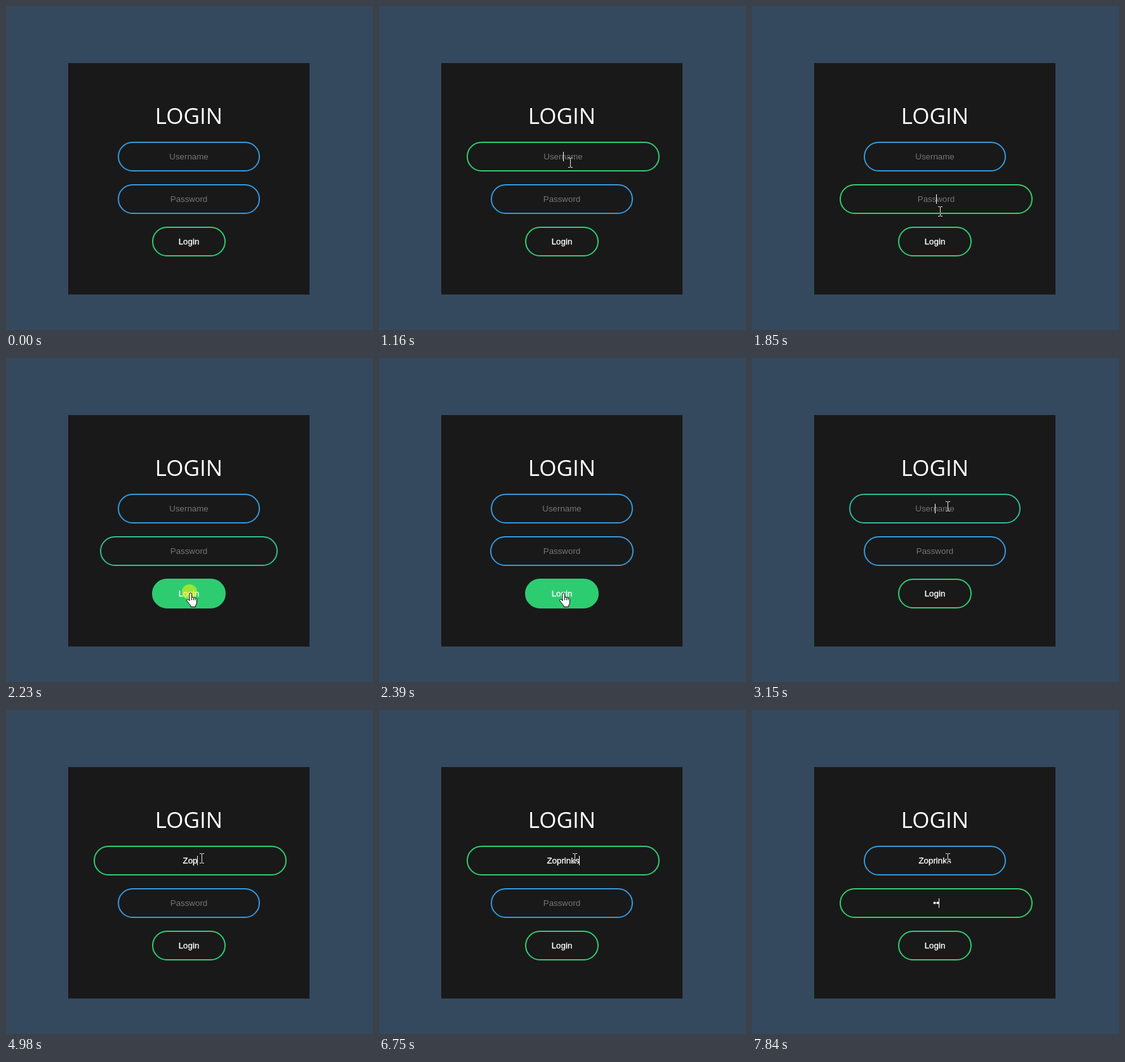
These frames come from a looping animation (578x511 px, 7.99 s). An HTML page with a canvas:

```html
<!DOCTYPE html>
<html lang="en">
<head>
<meta charset="utf-8">
<title>Login form</title>
<style>
  html, body { margin: 0; width: 100%; height: 100%; overflow: hidden; background: #34495e; }
  canvas { display: block; }
</style>
</head>
<body>
<canvas id="stage" width="578" height="511"></canvas>
<script>
const ctx = document.getElementById('stage').getContext('2d');

const LOOP = 7990, START = 380, TICK = 76.65, FADE = 250, BLINK = 540;
const BLUE = [52, 152, 219], GREEN = [46, 204, 113], DARK = [25, 25, 25];
const SANS = '13.333px "Liberation Sans", Arial, sans-serif';
const TITLE = '35px "Open Sans", "Noto Sans", sans-serif';

const NAME = 'Zoprinks';
const nameKeys = [4260, 4640, 4980, 5670, 5900, 6040, 6420, 6750];
const passKeys = [7670, 7840];

// focus spans [from, to]
const userFocus = [[895, 1500], [3056, 7030]];
const passFocus = [[1500, 2170], [7030, 9999]];
const RELOAD = 2440;
const hovers = [[1885, 9999, RELOAD], [2448, 2575, 9999]];
const blinkStarts = [895, 1500, 3090, ...nameKeys, 7060, ...passKeys];
const presses = [[890, 975], [1495, 1580], [2165, 2300], [3050, 3130]];

// pointer legs: start, end, x, y
const legs = [
  [380, 850, 301, 247],
  [1200, 1460, 298, 304],
  [1740, 1985, 290, 370],
  [2445, 2870, 308, 234]
];

const hand = new Path2D('M5 13V2.2a1.7 1.7 0 0 1 3.4 0V8a1.6 1.6 0 0 1 3 .4' +
  'a1.5 1.5 0 0 1 2.7 .7a1.4 1.4 0 0 1 2.4 1.1V15q0 3-1.8 5.2V22.5H7V20.5' +
  'Q4 17.5 .9 13a1.5 1.5 0 0 1 2.4-1.9Z');
const knuckles = new Path2D('M8.4 8V12M11.4 8.4V12M14.1 9.1V12');
const arrow = new Path2D('M.5 .5V16.5L4.2 13L6.6 18.6L9 17.6L6.7 12.2H11.8Z');

const clamp = v => Math.min(1, Math.max(0, v));
const smooth = p => p < .5 ? 2 * p * p : 1 - 2 * (1 - p) ** 2;
const within = (t, [from, to]) => t >= from && t < to;
const mix = (a, b, p) => `rgb(${a.map((v, i) => Math.round(v + (b[i] - v) * p))})`;

// CSS "ease": cubic-bezier(.25, .1, .25, 1)
function ease(p) {
  if (p <= 0) return 0;
  if (p >= 1) return 1;
  let lo = 0, hi = 1, s = .5;
  for (let i = 0; i < 24; i++) {
    s = (lo + hi) / 2;
    const x = .75 * s * (1 - s) + s ** 3;
    if (x < p) lo = s; else hi = s;
  }
  return .3 * s * (1 - s) ** 2 + 3 * s * s * (1 - s) + s ** 3;
}

const fade = (t, [on, off]) =>
  Math.min(ease((t - on) / FADE), 1 - ease((t - off) / FADE));
const fadeAny = (t, spans) => Math.max(...spans.map(s => fade(t, s)));

function hoverAt(t) {
  return Math.max(...hovers.map(h => t < h[2] ? fade(t, h) : 0));
}

function pointerAt(t) {
  let x = 475, y = 498;
  for (const [from, to, tx, ty] of legs) {
    const p = smooth(clamp((t - from) / (to - from)));
    x += (tx - x) * p;
    y += (ty - y) * p;
  }
  return { x: Math.round(x), y: Math.round(y) };
}

function caretOn(t) {
  const since = t - Math.max(...blinkStarts.filter(s => s <= t));
  return since % (2 * BLINK) < BLINK;
}

function label(str, x, y, color) {
  ctx.font = SANS;
  ctx.textAlign = 'center';
  ctx.fillStyle = color;
  ctx.fillText(str, x, y);
  if (color === '#fff') {
    ctx.strokeStyle = color;
    ctx.lineWidth = .3;
    ctx.strokeText(str, x, y);
  }
}

function pill(x, y, w, stroke, fill) {
  ctx.beginPath();
  ctx.roundRect(x + 1, y + 1, w - 2, 45, 22.5);
  if (fill) {
    ctx.fillStyle = fill;
    ctx.fill();
  }
  ctx.strokeStyle = stroke;
  ctx.lineWidth = 2;
  ctx.stroke();
}

function field(t, q, y, lift, spans, hint, value) {
  const p = fadeAny(q, spans);
  const w = 224 + 2 * Math.round(40 * p);
  const x = Math.max(138, 288 - w / 2);
  const mid = x + w / 2;
  pill(x, y + lift, w, mix(BLUE, GREEN, p));
  label(value || hint, mid, y + 28, value ? '#fff' : '#757575');
  if (spans.some(s => within(q, s)) && caretOn(t)) {
    ctx.fillStyle = '#fff';
    ctx.fillRect(Math.floor(mid + ctx.measureText(value).width / 2), y + 16, 1, 15);
  }
}

function shape(path, x, y, lines) {
  ctx.save();
  ctx.translate(x, y);
  ctx.fillStyle = '#fff';
  ctx.strokeStyle = '#000';
  ctx.lineWidth = 1;
  ctx.fill(path);
  ctx.stroke(path);
  if (lines) ctx.stroke(lines);
  ctx.restore();
}

function beam(x, y) {
  ctx.save();
  ctx.globalCompositeOperation = 'difference';
  ctx.fillStyle = '#fff';
  for (const edge of [y - 8, y + 7]) {
    ctx.fillRect(x - 3, edge, 3, 1);
    ctx.fillRect(x + 1, edge, 3, 1);
  }
  ctx.fillRect(x, y - 7, 1, 14);
  ctx.restore();
}

function pointer(q) {
  const { x, y } = pointerAt(q);
  if (presses.some(s => within(q, s))) {
    ctx.fillStyle = 'rgba(255,255,0,.5)';
    ctx.beginPath();
    ctx.arc(x - 1, y - 1, 12, 0, 2 * Math.PI);
    ctx.fill();
  }
  const overField = x > 176 && x < 400 && ((y >= 214 && y < 261) || (y >= 281 && y < 328));
  const overButton = x > 230 && x < 346 && y >= 348 && y < 395;
  if (overButton) shape(hand, x - 6, y, knuckles);
  else if (overField) beam(x, y);
  else shape(arrow, x, y);
}

function draw(t) {
  const q = t < START ? 0 : START + Math.floor((t - START) / TICK + .001) * TICK;
  const typed = nameKeys.filter(k => k <= t).length;
  const dots = passKeys.filter(k => k <= t).length;
  const lift = q > RELOAD && q < 2700 ? .5 : 0;

  ctx.fillStyle = '#34495e';
  ctx.fillRect(0, 0, 578, 511);
  ctx.fillStyle = mix(DARK, DARK, 0);
  ctx.fillRect(98, 90 + lift, 380, 365);

  ctx.font = TITLE;
  ctx.textAlign = 'center';
  ctx.fillStyle = '#fff';
  ctx.fillText('LOGIN', 288, 186);

  field(t, q, 214, lift, userFocus, 'Username', NAME.slice(0, typed));
  field(t, q, 281, lift, passFocus, 'Password', '•'.repeat(dots));

  pill(230, 348 + lift, 116, mix(GREEN, GREEN, 0), mix(DARK, GREEN, hoverAt(q)));
  label('Login', 288, 376, '#fff');

  if (q >= START) pointer(q);
}

const begin = performance.now();
function frame() {
  draw((performance.now() - begin) % LOOP);
  requestAnimationFrame(frame);
}
frame();
</script>
</body>
</html>
```
